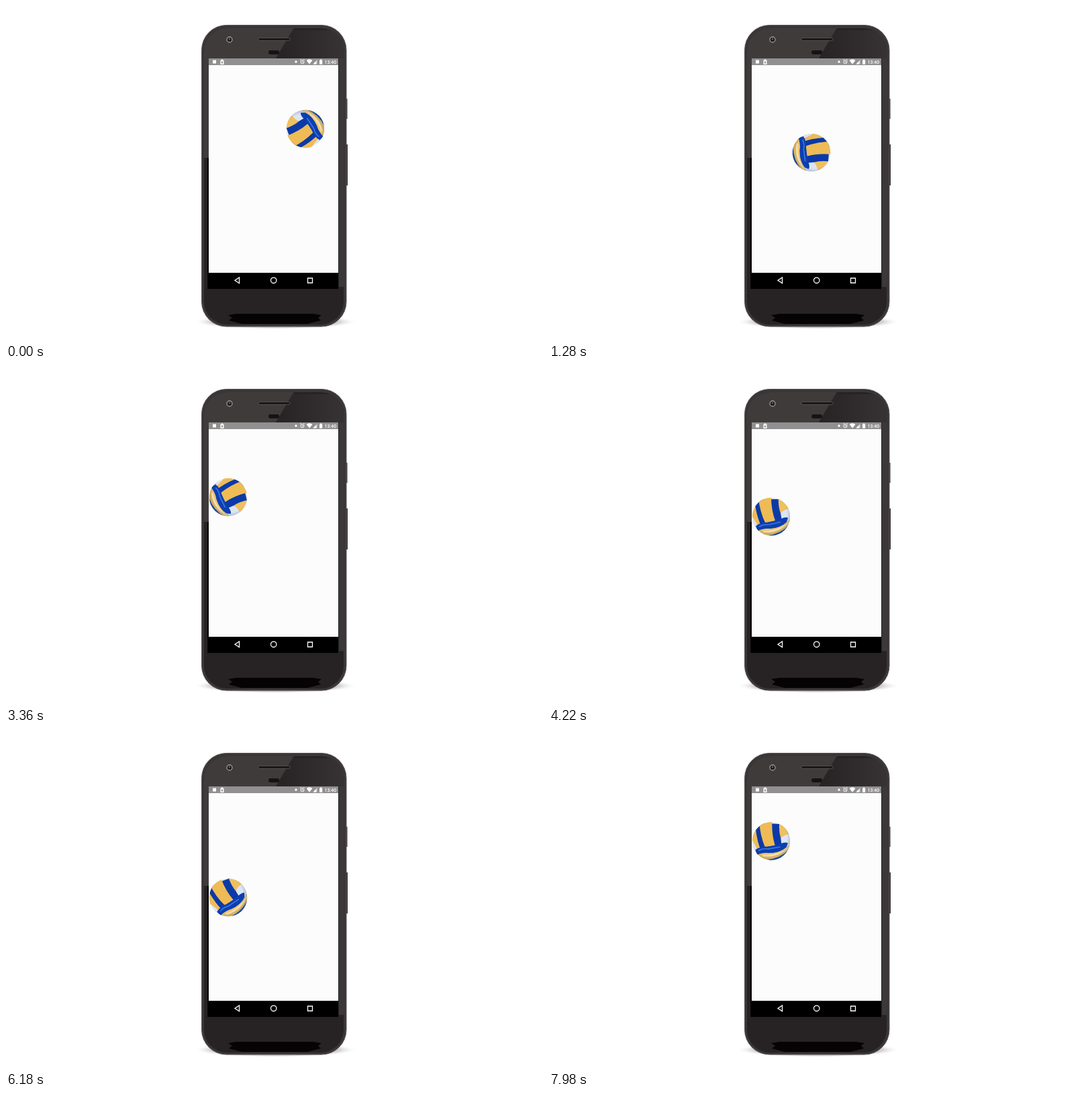
An HTML page for the animation above (8 s loop, 800 by 500 pixels).

```html
<!DOCTYPE html>
<html lang="en">
<head>
<meta charset="utf-8">
<title>Bouncing ball</title>
<style>
  html, body { margin: 0; width: 100%; height: 100%; overflow: hidden; background: #fff; }
  svg { display: block; width: 800px; height: 500px; }
  text { font: 500 7px Roboto, sans-serif; fill: #fff; }
</style>
</head>
<body>
<svg viewBox="0 0 800 500">
  <defs>
    <linearGradient id="gloss">
      <stop offset="0" stop-color="#272324"/><stop offset="1" stop-color="#373334"/>
    </linearGradient>
    <radialGradient id="shadow">
      <stop offset=".78" stop-color="#777" stop-opacity=".35"/><stop offset="1" stop-color="#fff" stop-opacity="0"/>
    </radialGradient>
    <radialGradient id="shade" cx=".45" cy=".42" r=".58">
      <stop offset=".8" stop-color="#123" stop-opacity="0"/><stop offset="1" stop-color="#123" stop-opacity=".25"/>
    </radialGradient>
    <clipPath id="body"><rect x="295" y="33" width="208" height="441" rx="34"/></clipPath>
    <clipPath id="round"><circle r="28.3"/></clipPath>
  </defs>

  <!-- phone body -->
  <ellipse cx="401" cy="470" rx="122" ry="11" fill="url(#shadow)"/>
  <path d="M506 138h2.500v30H506zM506 206h3v61h-3z" fill="#363233"/>
  <rect x="291.500" y="28.500" width="215.500" height="448.500" rx="37" fill="#3a3637" stroke="#5b5657"/>
  <g clip-path="url(#body)">
    <rect x="294" y="31" width="210" height="446" fill="#272324"/>
    <path d="M294 31H430L402 78H302V226H294z" fill="#403b3b"/>
    <path d="M427 36H504V78H402z" fill="url(#gloss)"/>
    <path d="M496 78h8v340h-8z" fill="#3c3839"/>
  </g>
  <path d="M300 226h3v195h-3z" fill="#050505"/>
  <path d="M331 460l12-2h114l13 2-5 4 4 4-20 5h-98l-19-5 5-4z" fill="#050303"/>
  <circle cx="333" cy="50" r="4" fill="#211d1e" stroke="#999" stroke-width="1.3"/>
  <circle cx="333" cy="49" r="1.3" fill="#625e62"/>
  <rect x="376" y="47.5" width="47" height="4" rx="2" fill="#1b1819" stroke="#625d5e" stroke-width=".7"/>
  <rect x="391" y="66" width="16" height="6" rx="3" fill="#161314"/>

  <!-- screen -->
  <path d="M302 88h193v309H302z" fill="#fcfcfc"/>
  <path d="M302 78h193v10H302z" fill="#919091"/>
  <path d="M302 397h193v24H302z" fill="#000"/>
  <g fill="#fff">
    <rect x="308" y="80.5" width="5" height="5"/>
    <path d="M319.5 80.5h1.5v-1h2v1h1.5v6.5h-5z"/>
    <path d="M321 82.5h2v3h-2z" fill="#919091"/>
    <circle cx="432" cy="83" r="1.7"/>
    <circle cx="441.5" cy="83.2" r="2.6" fill="none" stroke="#fff"/>
    <path d="M441.5 81.5v2h1.5M438 80.5l2-1.5M445 80.5l-2-1.5" fill="none" stroke="#fff" stroke-width=".8"/>
    <path d="M447.5 81q4.500-3.500 9 0l-4.500 5.500z"/>
    <path d="M457.5 86.500l6-6.500v6.500z" opacity=".65"/>
    <path d="M457.5 86.500l4-4.300v4.300z"/>
    <path d="M467 80.5h1.200v-1h1.800v1h1.200v6.300H467z"/>
    <text x="474.5" y="85.5">13:40</text>
  </g>
  <g fill="none" stroke="#fff" stroke-width="1.3">
    <path d="M347.5 404v8.500l-6.500-4.200z"/>
    <circle cx="398.7" cy="408.3" r="4.2"/>
    <path d="M449.5 405h7v7h-7z"/>
  </g>

  <!-- volleyball -->
  <g id="ball">
    <g clip-path="url(#round)">
      <circle r="28.3" fill="#dfe5f3"/>
      <path d="M-30-12L-22-20-16 8-20 14Q-26 2-30-2z" fill="#edbc58"/>
      <path d="M-24-18L-18-26H12L17 8-14 16Q-21 2-24-18z" fill="#0b3aa8"/>
      <path d="M-19-28Q-17-8-9 9L6 6Q0-10 0-30z" fill="#efbb55"/>
      <path d="M11-30Q10-16 14-5 20-11 29-12L24-26z" fill="#efc062"/>
      <path d="M14-5Q20-11 29-12V3L16 6z" fill="#dde5f5"/>
      <path d="M-23 14Q-14 7-4 9L15 3Q22 0 25 2L22 11Q8 19-8 18L-20 22z" fill="#0c3fb2"/>
      <path d="M-18 15Q-12 11-4 12L14 8" fill="none" stroke="#3f78dc" stroke-width="1.6"/>
      <path d="M-20 21Q-10 17-2 18 14 17 23 8L29 4 28 12Q16 25 0 27L-14 28z" fill="#f0c469"/>
      <path d="M-12 22Q10 24 27 8" fill="none" stroke="#f6e3ba" stroke-width="2.5"/>
      <path d="M-6 28Q14 26 27 12L31 18 9 34z" fill="#1850b8"/>
      <circle r="28.3" fill="url(#shade)"/>
    </g>
  </g>
</svg>
<script>
  const LOOP = 8000, BURST = 840, MOVING = 740;
  const ball = document.getElementById('ball');

  // Straight flight and constant spin between impacts: [ms, x, y, degrees]
  const flight = [
    [0, 446, 183, 250],
    [465, 420, 117, 87],
    [1280, 391, 218, 95],
    [2495, 348, 368, 105],
    [2990, 331, 266, 90],
    [3710, 331, 117, 64],
    [4220, 331, 218, 0],
    [4960, 331, 368, -108],
    [5440, 331, 314, -73],
    [6980, 331, 167, 36],
    [7490, 331, 117, 72],
    [8000, 331, 161, 0]
  ];

  function poseAt(time) {
    const next = flight.findIndex(key => key[0] > time);
    const from = flight[next - 1], to = flight[next];
    const part = (time - from[0]) / (to[0] - from[0]);
    return from.map((value, i) => value + (to[i] - value) * part);
  }

  function draw() {
    const time = performance.now() % LOOP;
    // Motion pauses briefly at the end of each burst.
    const pause = Math.max(0, (time + 20) % BURST - MOVING);
    const [, x, y, angle] = poseAt(time - pause);
    ball.setAttribute('transform', `translate(${x} ${y}) rotate(${angle})`);
    requestAnimationFrame(draw);
  }
  draw();
</script>
</body>
</html>
```
